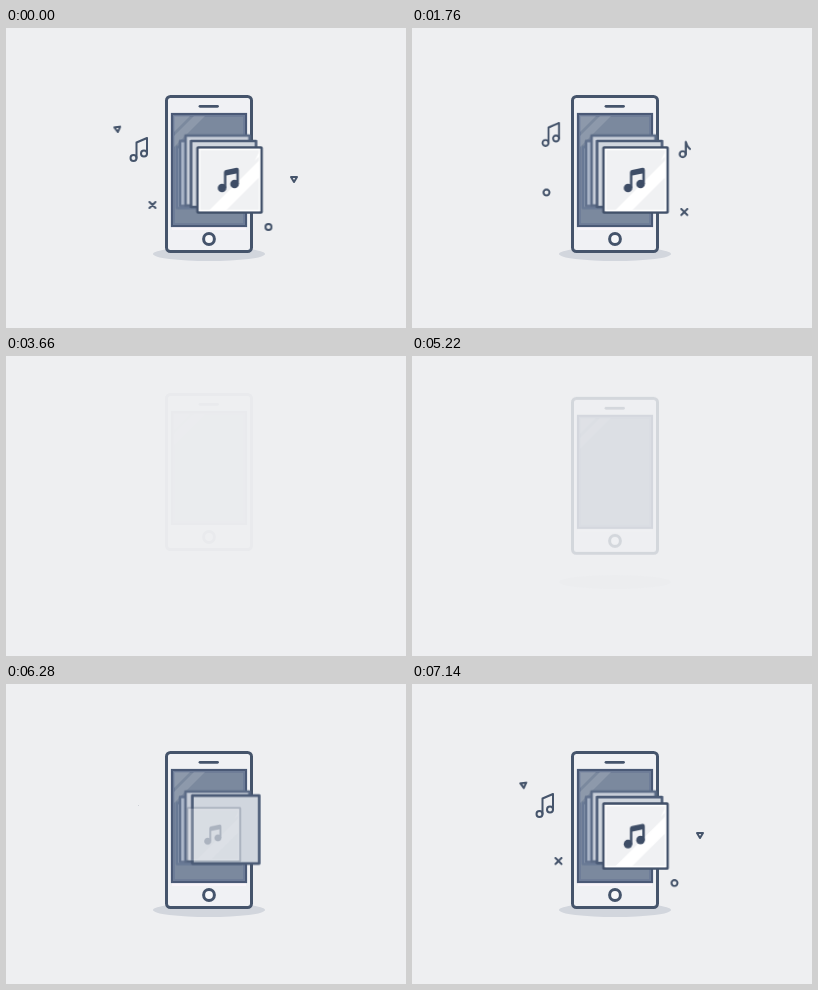
Recreate the animation shown at these times as an HTML page. Size 400 by 300 pixels, loop 7360 ms.

```html
<!DOCTYPE html>
<html lang="en">
<head>
<meta charset="utf-8">
<title>Music player</title>
<style>
  html, body { margin: 0; width: 100%; height: 100%; overflow: hidden; background: #eeeff1; }
  svg { display: block; width: 100vw; height: 100vh; }

  /* --d, --in and --out stagger the parts inside one shared loop */
  .phone, .shadow, .a, .b, .in, .out { animation: 7360ms linear infinite; }
  .phone { animation-name: phone; }
  .shadow { animation-name: shadow; }
  .a { animation-name: first; animation-delay: calc(var(--d) - 7360ms); }
  .b { animation-name: second; animation-delay: calc(var(--d) - 7360ms); }
  .in { animation-name: rise; animation-delay: calc(var(--in) - 7360ms); }
  .out { animation-name: sink; animation-delay: calc(var(--out) - 7360ms); }

  .line { fill: none; stroke: #45546b; stroke-width: 2; stroke-linecap: round; stroke-linejoin: round; }
  .card { stroke-width: 2.6; stroke-linejoin: round; }

  @keyframes phone {
    0%, 42.39% { transform: none; opacity: 1; animation-timing-function: ease; }
    49.46%, 70.38% { transform: translateY(-30px); opacity: .03; animation-timing-function: ease; }
    75%, 100% { transform: none; opacity: 1; }
  }
  @keyframes shadow {
    0%, 40.76% { opacity: 1; }
    45.11%, 70.65% { opacity: 0; }
    75%, 100% { opacity: 1; }
  }
  @keyframes rise {
    0%, 50.27% { transform: none; opacity: 1; }
    50.28%, 74.73% { transform: translate(var(--x), var(--y)) scale(.74); opacity: 0; }
    76.09% { transform: translate(calc(var(--x) * .7), calc(var(--y) * .7)) scale(.82); opacity: .25; }
    78.53% { transform: translate(calc(var(--x) * -.14), calc(var(--y) * -.14)) scale(1.03); opacity: 1; animation-timing-function: ease-in-out; }
    80.98%, 100% { transform: none; opacity: 1; }
  }
  @keyframes sink {
    0%, 35.33% { transform: none; opacity: 1; animation-timing-function: ease-in; }
    37.77% { transform: translate(calc(var(--x) * .5), calc(var(--y) * .5)) scale(.87); opacity: 1; animation-timing-function: ease-out; }
    40.22%, 60% { transform: translate(var(--x), var(--y)) scale(.74); opacity: 0; }
    60.01%, 100% { transform: none; opacity: 1; }
  }
  @keyframes first {
    0%, 5.16% { transform: none; animation-timing-function: ease-in; }
    8.42%, 85.2% { transform: scale(0); animation-timing-function: ease-out; }
    87.8% { transform: scale(1.2); animation-timing-function: ease-in-out; }
    89.7% { transform: scale(.92); animation-timing-function: ease-in-out; }
    91.6% { transform: scale(1.03); animation-timing-function: ease-in-out; }
    93.5%, 100% { transform: none; }
  }
  @keyframes second {
    0%, 10.33% { transform: scale(0); animation-timing-function: ease-out; }
    13.04% { transform: scale(1.2); animation-timing-function: ease-in-out; }
    14.95% { transform: scale(.92); animation-timing-function: ease-in-out; }
    16.85% { transform: scale(1.03); animation-timing-function: ease-in-out; }
    18.75%, 35.33% { transform: none; animation-timing-function: ease-in; }
    39%, 100% { transform: scale(0); }
  }
</style>
</head>
<body>
<svg viewBox="0 0 400 300">
  <defs>
    <g id="notes">
      <circle cx="-5.5" cy="9" r="3"/>
      <circle cx="5" cy="4.5" r="3"/>
      <path d="M-2.5 9V-6.5L8-11V4.5"/>
    </g>
    <path id="cross" d="M-3-3L3 3M3-3L-3 3"/>
    <circle id="ring" r="3"/>
    <path id="tri" d="M-3-2H3L0 3Z"/>
  </defs>

  <ellipse class="shadow" cx="203" cy="226" rx="56" ry="7" fill="#d2d6dd"/>

  <g class="phone">
    <rect x="160.5" y="68.5" width="85" height="155" rx="4" fill="#f0f1f4" stroke="#45546b" stroke-width="3"/>
    <path d="M194 78.3H211.5" class="line" style="stroke-width:2.8"/>
    <path d="M166 200.5H240" stroke="#f9f5fa" stroke-width="3"/>
    <rect x="166" y="86" width="74" height="112" fill="#7b899e" stroke="#4a5976" stroke-width="2.2"/>
    <rect x="168" y="88" width="70" height="108" fill="none" stroke="#6c7b97" stroke-width="1.6"/>
    <path d="M168 88H184L168 104ZM188 88H199L168 119V108Z" fill="#fff" opacity=".14"/>
    <circle cx="203" cy="211" r="5.4" fill="#f7f8fa" stroke="#45546b" stroke-width="3"/>

    <g transform="translate(203 149.5)" style="--x:-2px;--y:.5px;--in:0ms;--out:420ms">
      <g class="out"><g class="in">
        <rect class="card" x="-32" y="-30.5" width="64" height="61" fill="#9ba8bc" stroke="#687995"/>
      </g></g>
    </g>
    <g transform="translate(206 145.5)" style="--x:-5px;--y:4.5px;--in:160ms;--out:380ms">
      <g class="out"><g class="in">
        <rect class="card" x="-32" y="-32.5" width="64" height="65" fill="#adb8ca" stroke="#62728e"/>
      </g></g>
    </g>
    <g transform="translate(211.5 142.5)" style="--x:-10.5px;--y:7.5px;--in:320ms;--out:340ms">
      <g class="out"><g class="in">
        <rect class="card" x="-32" y="-35" width="64" height="70" fill="#c8ced9" stroke="#5b6b86"/>
      </g></g>
    </g>
    <g transform="translate(217.5 146)" style="--x:-16.5px;--y:4px;--in:480ms;--out:0ms">
      <g class="out"><g class="in">
        <rect class="card" x="-32.5" y="-33" width="65" height="66" fill="#d0d6de" stroke="#4b5b76"/>
      </g></g>
    </g>
    <g transform="translate(223.5 152)" style="--x:-22.5px;--y:-2px;--in:680ms;--out:120ms">
      <g class="out"><g class="in">
        <rect class="card" x="-32" y="-32.5" width="64" height="65" rx=".5" fill="#f0f1f3" stroke="#42516a"/>
        <path d="M30-20V-3L-4 31H-21ZM30-29V-24L25-19Z" fill="#fff"/>
        <rect x="-30" y="-30.5" width="60" height="61" fill="none" stroke="#fff" stroke-width="1.5"/>
        <g fill="#3e4d66">
          <circle cx="-7.5" cy="8" r="4.3"/>
          <circle cx="5" cy="4" r="4.3"/>
          <path d="M-5.6 8V-7.5Q-5.6-9.6-3.6-10L7-12.2Q9.3-12.4 9.3-10V4H6.8V-6.6L-3.2-4.4V8Z"/>
        </g>
      </g></g>
    </g>
  </g>

  <g class="line">
    <g transform="translate(133 121)"><use href="#notes" class="a" style="--d:0ms"/></g>
    <g transform="translate(146.5 177)"><use href="#cross" class="a" style="--d:60ms"/></g>
    <g transform="translate(262.5 199)"><use href="#ring" class="a" style="--d:120ms"/></g>
    <g transform="translate(111.5 101) rotate(-6)"><use href="#tri" class="a" style="--d:180ms"/></g>
    <g transform="translate(288 151)"><use href="#tri" class="a" style="--d:220ms"/></g>

    <g transform="translate(139 106)"><use href="#notes" class="b" style="--d:0ms"/></g>
    <g transform="translate(134.5 164.5)"><use href="#ring" class="b" style="--d:60ms"/></g>
    <g transform="translate(272.3 184)"><use href="#cross" class="b" style="--d:90ms"/></g>
    <g transform="translate(272.5 121.5)">
      <g class="b" style="--d:30ms">
        <circle cx="-1.8" cy="4.7" r="3"/>
        <path d="M1.3 4.7V-7.5Q2-3.5 5.5-.5"/>
      </g>
    </g>
  </g>
</svg>
</body>
</html>
```
